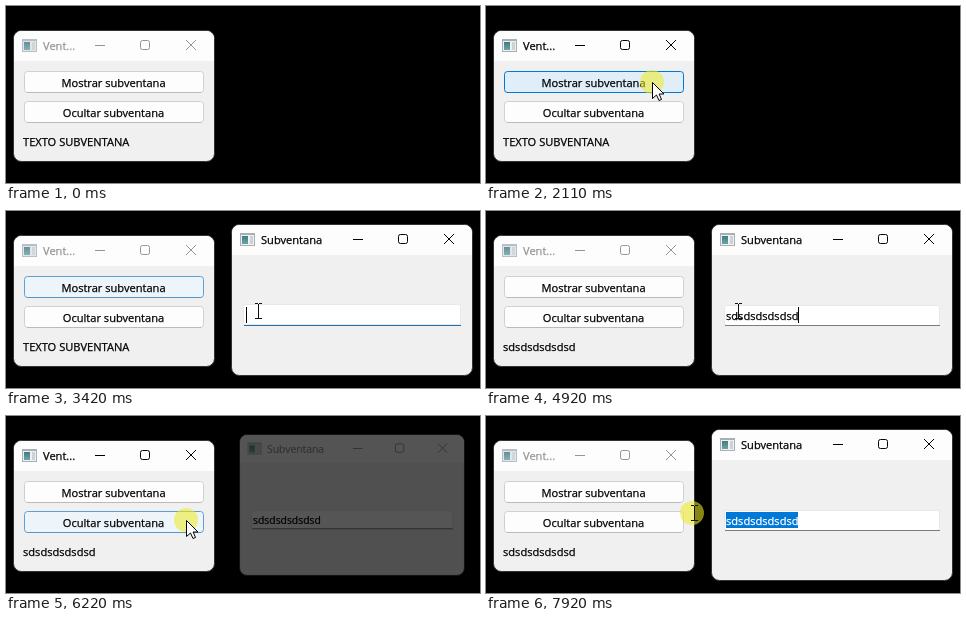
Write an HTML page with a canvas that moves like this. It is 474 px wide and 177 px high and loops after 8000 ms.

```html
<!DOCTYPE html>
<html lang="es">
<head>
<meta charset="utf-8">
<title>Ventana y subventana</title>
<style>
html, body { margin: 0; width: 100%; height: 100%; overflow: hidden; background: #000; }
canvas { display: block; }
</style>
</head>
<body>
<canvas id="stage" width="474" height="177"></canvas>
<script>
const ctx = document.getElementById('stage').getContext('2d');
const LOOP = 8000;
const FONT = '11.1px "Open Sans", "Noto Sans", sans-serif';

const GREY = [208, 208, 208];
const BLUE = [0, 120, 212];
const WHITE = [253, 253, 253];
const PALE_BLUE = [224, 238, 249];

const clamp = (v, lo, hi) => Math.min(hi, Math.max(lo, v));
const within = (t, from, to) => t >= from && t < to;
const ramp = (t, from, length) => clamp((t - from) / length, 0, 1);
const smooth = k => k * k * (3 - 2 * k);
const pulse = (t, on, off, fade = 200) => ramp(t, on, fade) - ramp(t, off, fade);
const mix = (from, to, k) => `rgb(${from.map((v, i) => Math.round(v + (to[i] - v) * k))})`;

const entry = { x: 146, y: 186 };
const moves = [
  { at: 610, length: 700, x: 170, y: 82 },
  { at: 1510, length: 500, x: 166, y: 76 },
  { at: 3120, length: 300, x: 252, y: 100 },
  { at: 5220, length: 800, x: 180, y: 104 },
  { at: 6520, length: 500, x: 178, y: 76 },
  { at: 7420, length: 500, x: 206, y: 97 }
];

function pointerAt(t) {
  return moves.reduce((p, m) => {
    const k = smooth(ramp(t, m.at, m.length));
    return { x: p.x + (m.x - p.x) * k, y: p.y + (m.y - p.y) * k };
  }, entry);
}

// Each button glows while hovered and more strongly while pressed.
function showGlow(t) {
  const hover = pulse(t, 1010, 3420) + pulse(t, 6820, 7520);
  const press = pulse(t, 1910, 2320) + pulse(t, 7120, 7320);
  return 0.55 * hover + 0.45 * press;
}

function hideGlow(t) {
  return 0.55 * pulse(t, 5820, 6620) + 0.45 * pulse(t, 6020, 6120, 100);
}

const subShown = t => pulse(t, 2110, 6020, 300) + ramp(t, 7120, 300);

function box(x, y, w, h, r, fill, stroke) {
  ctx.beginPath();
  ctx.roundRect(x, y, w, h, r);
  if (fill) { ctx.fillStyle = fill; ctx.fill(); }
  if (stroke) { ctx.strokeStyle = stroke; ctx.lineWidth = 1; ctx.stroke(); }
}

function rect(x, y, w, h, color) {
  ctx.fillStyle = color;
  ctx.fillRect(x, y, w, h);
}

// A hairline outline gives the text its slightly heavy look.
function text(s, x, y, color = '#000', align = 'left') {
  ctx.font = FONT;
  ctx.textAlign = align;
  ctx.fillStyle = ctx.strokeStyle = color;
  ctx.lineWidth = 0.25;
  ctx.fillText(s, x, y);
  ctx.strokeText(s, x, y);
}

function appIcon(x, y, active) {
  ctx.globalAlpha = active ? 1 : 0.8;
  rect(x, y, 15, 13, '#a9b0b4');
  rect(x + 1, y + 2, 13, 10, '#eef1f2');
  const teal = ctx.createLinearGradient(0, y + 2, 0, y + 12);
  teal.addColorStop(0, '#3d7580');
  teal.addColorStop(1, '#72aaa9');
  rect(x + 2, y + 3, 6, 8, teal);
  rect(x + 10, y + 3, 3, 8, '#cdd3d5');
  ctx.globalAlpha = 1;
}

function frame(x, y, w, h, title, active) {
  const ink = active ? '#000' : '#959595';
  const right = x + w;
  box(x - 0.5, y - 0.5, w + 1, h + 1, 8, '#f0f0f0', '#333');
  box(x, y, w, 30, [7.5, 7.5, 0, 0], '#fdfdfd');
  appIcon(x + 8, y + 8, active);
  text(title, x + 29, y + 19, ink);

  rect(right - 119, y + 14, 10, 1, ink);
  box(right - 73.5, y + 9.5, 9, 9, 2, null, ink);
  ctx.beginPath();
  ctx.moveTo(right - 28, y + 9);
  ctx.lineTo(right - 18, y + 19);
  ctx.moveTo(right - 18, y + 9);
  ctx.lineTo(right - 28, y + 19);
  ctx.stroke();
}

function button(y, label, glow) {
  const border = mix(GREY, BLUE, glow);
  box(18.5, y + 0.5, 179, 21, 3, mix(WHITE, PALE_BLUE, glow), border);
  rect(21, y + 21, 174, 1, mix([186, 186, 186], BLUE, glow));
  text(label, 107.5, y + 16, '#000', 'center');
}

function mainWindow(t, typed) {
  const active = within(t, 1310, 2320) || within(t, 5820, 7320);
  frame(8, 25, 200, 130, 'Vent...', active);
  button(65, 'Mostrar subventana', showGlow(t));
  button(95, 'Ocultar subventana', hideGlow(t));
  text(typed || 'TEXTO SUBVENTANA', 17, 140);
}

function textField(t, typed) {
  const accent = t < 3520 || within(t, 7120, 7720);
  const grow = accent ? 1 : 0;
  box(238.5 - grow, 94.5 - grow, 215 + grow * 2, 20, 2, '#fff', '#e8e8e8');
  rect(239 - grow, 114, 215 + grow * 2, 1, accent ? '#1f6fb5' : '#7c7c7c');

  ctx.font = FONT;
  const width = Math.floor(ctx.measureText(typed).width);
  const selected = t >= 7120;
  if (selected) rect(240, 96, width, 16, '#0078d7');
  text(typed, 240, 109, selected ? '#fff' : '#000');

  const blinkOn = Math.floor((t - 2320) / 500) % 2 === 0;
  const caret = t < 3520 ? blinkOn : t < 5420;
  if (caret) rect(240 + width, 96, 1, 16, '#000');
}

function subWindow(t, typed) {
  const shown = subShown(t);
  if (shown <= 0) return;
  const scale = 0.9 + 0.1 * shown;
  ctx.save();
  ctx.translate(346, 89);
  ctx.scale(scale, scale);
  ctx.translate(-346, -89);
  frame(226, 14, 240, 150, 'Subventana', !within(t, 5820, 7120));
  textField(t, typed);
  rect(224, 12, 244, 154, `rgba(0,0,0,${1 - shown})`);
  ctx.restore();
}

function arrow(x, y) {
  const outline = [[0, 0], [0, 16], [4, 12.5], [6.5, 18], [9, 17], [6.6, 11.5], [11.5, 11.5]];
  ctx.beginPath();
  outline.forEach(([dx, dy]) => ctx.lineTo(x + dx, y + dy));
  ctx.closePath();
  ctx.fillStyle = '#fff';
  ctx.fill();
  ctx.strokeStyle = '#000';
  ctx.lineWidth = 1;
  ctx.stroke();
}

function beam(x, y) {
  rect(x, y - 7, 1, 15, '#111');
  for (const dy of [-8, 7]) {
    rect(x - 3, y + dy, 3, 1, '#111');
    rect(x + 1, y + dy, 3, 1, '#111');
  }
}

function pointer(t) {
  if (t < 710) return;
  const { x, y } = pointerAt(t);
  const inField = x > 238;
  if (!inField) {
    ctx.beginPath();
    ctx.arc(x, y, 12, 0, Math.PI * 2);
    ctx.fillStyle = 'rgba(240,234,40,0.57)';
    ctx.fill();
  }
  const overText = inField || x > 204 && t > 7420;
  if (overText) beam(Math.round(x) + (inField ? 0 : 2), Math.round(y));
  else arrow(x + 0.5, y + 0.5);
}

// The scene advances in tenths of a second, like a screen recording.
function tick(t) {
  if (t < 710) return 0;
  const offset = t < 2320 ? 10 : 20;
  return Math.floor((t - offset) / 100) * 100 + offset;
}

// Three bursts of four letters, half a second apart.
function typedText(t) {
  let count = 0;
  for (let start = 3520; start <= 4520; start += 500) {
    count += Math.floor(4 * ramp(t, start, 400));
  }
  return 'sd'.repeat(6).slice(0, count);
}

function draw(now) {
  const t = tick(now % LOOP);
  const typed = typedText(t);
  rect(0, 0, 474, 177, '#000');
  mainWindow(t, typed);
  subWindow(t, typed);
  pointer(t);
}

let start;
function loop(now) {
  start ??= now;
  draw(now - start);
  requestAnimationFrame(loop);
}
draw(0);
requestAnimationFrame(loop);
</script>
</body>
</html>
```
